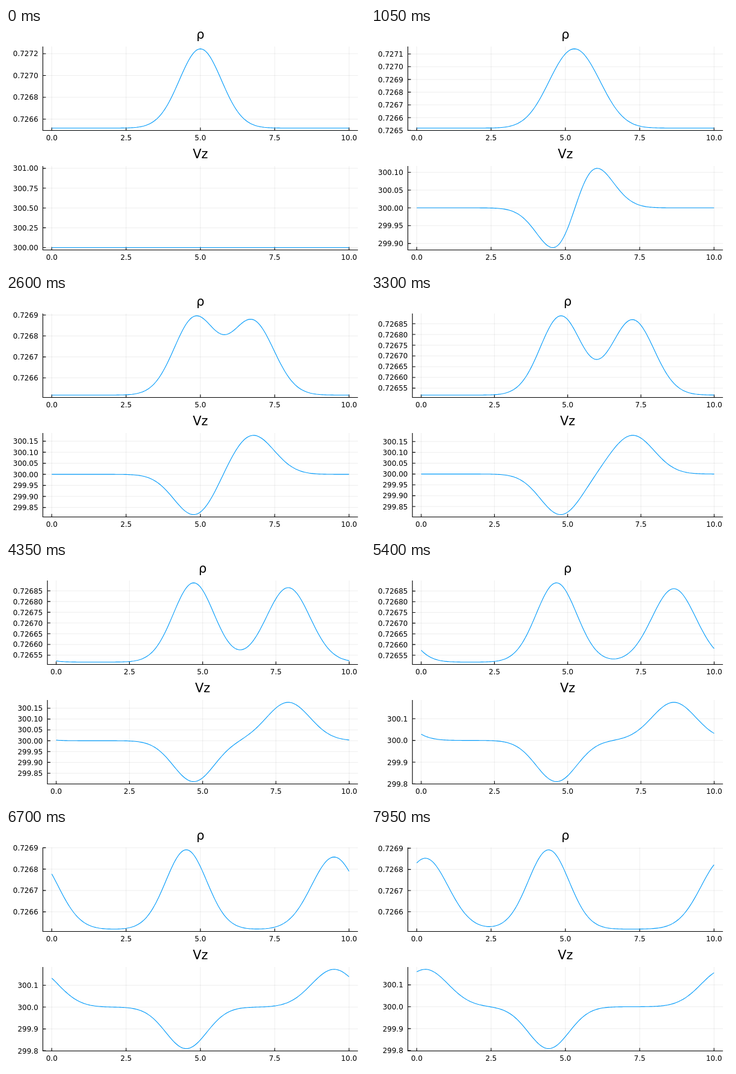
An HTML page for the animation above (8000 ms loop, 600x400 px).

```html
<!DOCTYPE html>
<html lang="en">
<head>
<meta charset="utf-8">
<title>Density and velocity of a travelling pulse</title>
<style>
  html, body { margin: 0; width: 100%; height: 100%; overflow: hidden; background: #fff; }
  svg { display: block; width: 600px; height: 400px; }
  text { font: 12px "DejaVu Sans", sans-serif; fill: #000; }
  .title { font-size: 21px; text-anchor: middle; }
  .x { text-anchor: middle; }
  .y { text-anchor: end; }
  path { fill: none; }
  .grid { stroke: #000; stroke-opacity: .07; }
  .axis { stroke: #000; stroke-width: 1.1; }
  .curve { stroke: #009afa; stroke-width: 1.1; stroke-linejoin: round; }
</style>
</head>
<body>
<svg id="stage" viewBox="0 0 600 400"></svg>
<script>
const STEP_MS = 50, STEPS = 160;
const POINTS = 201, DX = 0.05, DT = 5e-5;
const FLOW = 300, RT = 8.314 * 298 / 0.018, RHO0 = 1e5 / RT;

const RIGHT = 588.2, MARGIN = 11.8, LABEL_GAP = 7.8, DIGIT = 7.635;
const TOP = 30.9, BOTTOM = 171.5, PAD = 0.03, TICK = 5;
const X_TICKS = [0, 2.5, 5, 7.5, 10];
// Tick step mantissas with their niceness; earlier entries win ties.
const NICE = [[1, 1], [5, 0.9], [2.5, 0.5], [2, 0.7], [3, 0.2]];

// Isothermal gas on a periodic grid, explicit Euler with backward differences.
// r: relative density excess, w: velocity excess.
function advance({ r, w }) {
  const k = DT / DX, next = { r: [], w: [] };
  for (let i = 0; i < POINTS; i++) {
    const j = (i + POINTS - 1) % POINTS;
    const dr = r[i] - r[j], dw = w[i] - w[j];
    next.r[i] = r[i] - k * (FLOW * dr + dw + r[i] * w[i] - r[j] * w[j]);
    next.w[i] = w[i] - k * ((FLOW + w[i]) * dw + RT * dr / (1 + r[i]));
  }
  return next;
}

function simulate() {
  const r = Array.from({ length: POINTS }, (_, i) => 1e-3 * Math.exp(-((i * DX - 5) ** 2)));
  const states = [{ r, w: r.map(() => 0) }];
  while (states.length < STEPS) states.push(advance(states[states.length - 1]));
  return states;
}

function limits(values) {
  const lo = Math.min(...values);
  let hi = Math.max(...values);
  if (hi === lo) hi = lo + 1;
  const pad = PAD * (hi - lo);
  return [lo - pad, hi + pad];
}

// Picks four to eight ticks by weighing count, coverage and niceness.
function chooseTicks([lo, hi]) {
  const span = hi - lo, top = Math.floor(Math.log10(span));
  let best = { score: -Infinity };
  for (let z = top; z > top - 3; z--) {
    for (const [q, nice] of NICE) {
      const step = q * 10 ** z;
      const first = Math.ceil(lo / step), count = Math.floor(hi / step) - first + 1;
      if (count < 4 || count > 8) continue;
      const score = (1 - Math.abs(count - 5) / 5) / 4 + span / (count - 1) / step / 2 + nice / 4;
      if (score > best.score + 1e-9) {
        best = { score, step, first, count, digits: Math.max(0, (q === 2.5 ? 1 : 0) - z) };
      }
    }
  }
  return Array.from({ length: best.count }, (_, i) => {
    const value = (best.first + i) * best.step;
    return { value, label: value.toFixed(best.digits) };
  });
}

function makePlot(title, values) {
  const range = limits(values);
  return { title, values, range, ticks: chooseTicks(range) };
}

const px = n => n.toFixed(2);
const text = (cls, x, y, s) => `<text class="${cls}" x="${px(x)}" y="${px(y)}">${s}</text>`;
const path = (cls, d) => `<path class="${cls}" d="${d}"/>`;

function drawPlot({ title, values, range: [lo, hi], ticks }, left, offset) {
  const top = TOP + offset, bottom = BOTTOM + offset;
  const toX = x => left + (x / 10 + PAD) / (1 + 2 * PAD) * (RIGHT - left);
  const toY = v => bottom - (v - lo) / (hi - lo) * (bottom - top);
  let grid = '', labels = '';
  let axis = `M${px(left)} ${px(top)}V${px(bottom)}H${RIGHT}`;
  for (const t of X_TICKS) {
    const x = px(toX(t));
    grid += `M${x} ${px(top)}V${px(bottom)}`;
    axis += `M${x} ${px(bottom)}v-${TICK}`;
    labels += text('x', toX(t), bottom + 16.2, t.toFixed(1));
  }
  for (const { value, label } of ticks) {
    const y = toY(value);
    grid += `M${px(left)} ${px(y)}H${RIGHT}`;
    axis += `M${px(left)} ${px(y)}h${TICK}`;
    labels += text('y', left - LABEL_GAP, y + 4.5, label);
  }
  const curve = 'M' + values.map((v, i) => `${px(toX(i * DX))} ${px(toY(v))}`).join('L');
  return path('grid', grid) + path('axis', axis) + path('curve', curve) + labels +
    text('title', (left + RIGHT) / 2, offset + 18.2, title);
}

function drawStep({ r, w }) {
  const plots = [
    makePlot('ρ', r.map(v => RHO0 * (1 + v))),
    makePlot('Vz', w.map(v => FLOW + v))
  ];
  const chars = Math.max(...plots.flatMap(p => p.ticks.map(t => t.label.length)));
  const left = MARGIN + (chars - 0.5) * DIGIT + LABEL_GAP;
  return plots.map((p, i) => drawPlot(p, left, i * 200)).join('');
}

const stage = document.getElementById('stage');
const states = simulate();
const start = performance.now();
let shown = -1;

function tick() {
  const step = Math.floor((performance.now() - start) / STEP_MS) % STEPS;
  if (step !== shown) {
    stage.innerHTML = drawStep(states[step]);
    shown = step;
  }
  requestAnimationFrame(tick);
}
tick();
</script>
</body>
</html>
```
